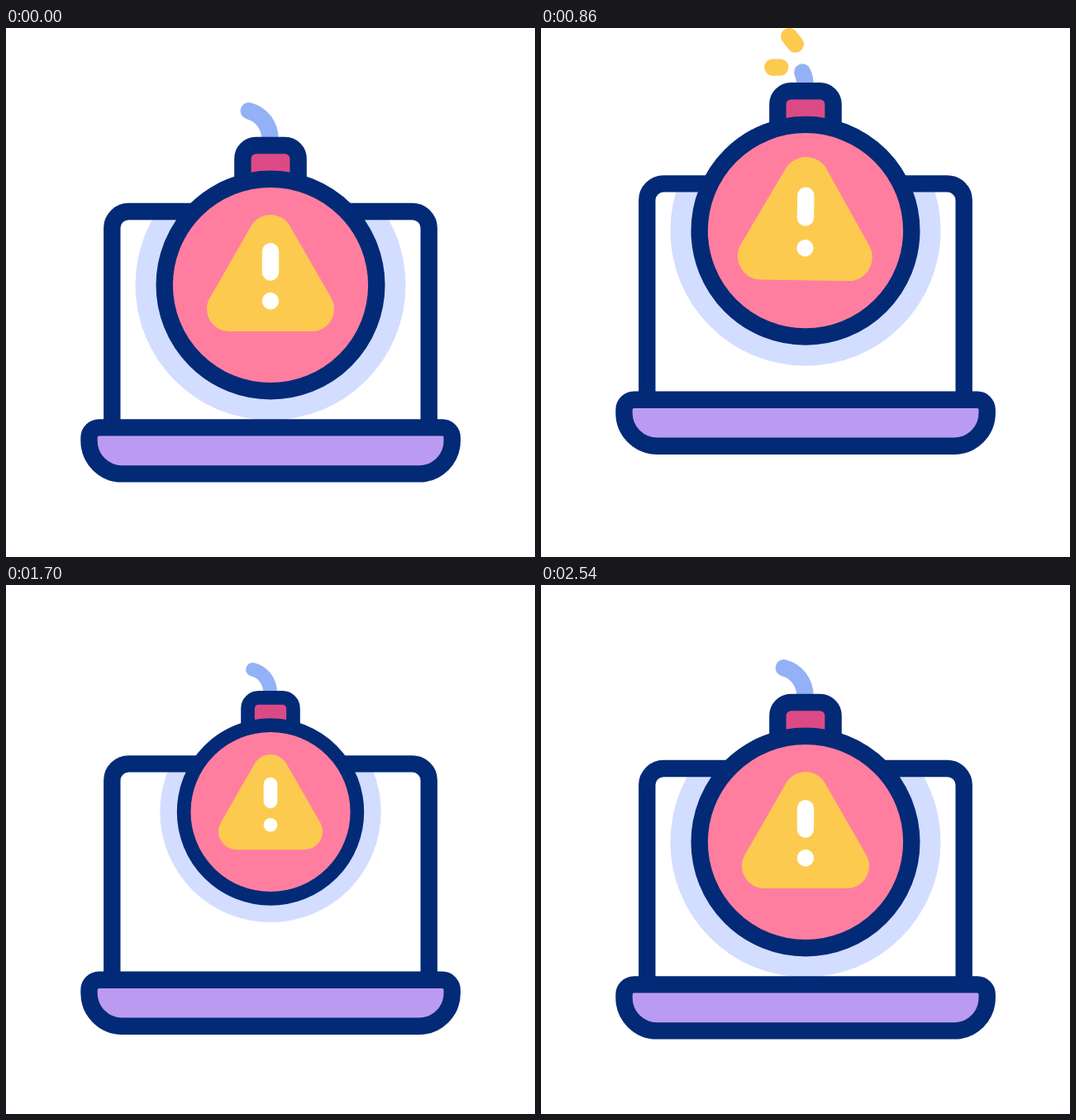
Animation, 640 px wide and 640 px high, one loop 3000 ms. Source, as an HTML page:

```html
<!DOCTYPE html>
<html lang="en">
<head>
<meta charset="utf-8">
<title>Laptop bomb</title>
<style>
  html, body { margin: 0; width: 100%; height: 100%; overflow: hidden; background: #fff; }
  svg { display: block; width: 100vw; height: 100vh; }
  .line { stroke: #032a76; stroke-width: 20.4; }
  .spark { stroke: #fdca50; stroke-width: 20.4; stroke-linecap: round; fill: none; }
</style>
</head>
<body>
<svg viewBox="0 0 640 640">
  <defs>
    <clipPath id="screen"><rect id="screenBox" x="128.5" y="222" width="383" height="262" rx="20"/></clipPath>
  </defs>
  <g clip-path="url(#screen)">
    <circle id="halo" cx="320" cy="311" r="163.5" fill="#d3ddff"/>
  </g>
  <g id="laptop" class="line">
    <path fill="none" d="M128.3 484V242a20 20 0 0 1 20-20H491.7a20 20 0 0 1 20 20V484"/>
    <path fill="#bb9bf1" d="M112.5 483.4H527.5a12 12 0 0 1 12.2 12V499.4a40 40 0 0 1-40 40H140.5a40 40 0 0 1-40-40V495.4a12 12 0 0 1 12-12z"/>
  </g>
  <g id="bomb">
    <path id="sparks" class="spark" d="M-16-43.5L-8.5-34M-36-6H-27"/>
    <path id="fuse" d="M319.6 142V135C319.6 118 309 104 293.8 100.3" pathLength="1" fill="none" stroke="#93b1f6" stroke-width="20.4" stroke-linecap="round"/>
    <path class="line" fill="#dc4a85" d="M286.4 200V158a16 16 0 0 1 16-16H337.6a16 16 0 0 1 16 16V200"/>
    <circle class="line" cx="320" cy="311" r="128.3" fill="#ff7ea0"/>
    <g id="sign" fill="#fdca50" stroke="#fdca50" stroke-linejoin="round">
      <path id="plate" d="M0-43.5L50 43.5H-50z" stroke-width="54"/>
      <path id="mark" fill="none" stroke="#fff" stroke-width="20.4" stroke-linecap="round"/>
    </g>
  </g>
  <path id="rays" class="spark"/>
</svg>
<script>
const LOOP = 3000, STEP = 20;
const BLAST = 1300, REBIRTH = 1500;
const { PI, sin, cos, min, max, floor } = Math;
const $ = id => document.getElementById(id);

// Progress from 0 to 1 between two times, and easings of it.
const span = (t, a, b) => min(1, max(0, (t - a) / (b - a)));
const smooth = u => u * u * (3 - 2 * u);
const easeOut = (u, p) => 1 - (1 - u) ** p;
const mix = (a, b, u) => a + (b - a) * u;

function laptopY(t) {
  if (t < 560) return 21 * span(t, 220, 560) ** 1.6;
  if (t < 1120) return mix(21, -39, easeOut(span(t, 560, 1120), 3.15));
  if (t < 1440) return mix(-39, 21.5, smooth(span(t, 1120, 1440)));
  // The recoil dies out as a damped swing.
  return 21.5 * (1 - span(t, 1440, 2240)) * cos(2 * PI * (t - 1440) / 830);
}

function bombY(t) {
  if (t < 490) return 33.8 * smooth(span(t, 220, 490));
  if (t < REBIRTH) return mix(33.8, -82.2, easeOut(span(t, 490, 1120), 2.21));
  return mix(-82.2, 0, easeOut(span(t, REBIRTH, 2200), 2.41));
}

const bombSize = t => t < REBIRTH
  ? 1 - span(t, 1028, 1320) ** 2
  : smooth(span(t, 1540, 1760));

const bombTilt = t =>
  6.7 * (1 - span(t, 1800, 2380)) ** 2 * sin(2 * PI * max(0, t - 1800) / 320);

const signSize = t => t < REBIRTH
  ? 1 - 0.241 * sin(PI * span(t, 220, 740)) ** 2 + 0.106 * smooth(span(t, 740, 966))
  : 1;

const signTilt = t => 4.5 * sin(2 * PI * span(t, 850, 1210));

const show = (el, on) => el.setAttribute('visibility', on ? 'visible' : 'hidden');
const move = (id, value) => $(id).setAttribute('transform', value);

function drawSign(t) {
  const s = signSize(t);
  move('sign', `translate(320 296.5) rotate(${signTilt(t)})`);
  move('plate', `scale(${s})`);
  // The mark keeps its line weight while its points spread.
  $('mark').setAttribute('d', `M0 ${4 - 30.3 * s}V${4 - 5 * s}M0 ${4 + 29.8 * s}h.01`);
}

function drawFuse(t) {
  const left = t < REBIRTH ? 1 - span(t, 460, 1162) : 1;
  const fuse = $('fuse');
  show(fuse, left > 0);
  fuse.setAttribute('stroke-dasharray', left < 1 ? `${left} 2` : 'none');
  const tip = fuse.getPointAtLength(fuse.getTotalLength() * left);
  show($('sparks'), t >= 680 && t < 1040);
  move('sparks', `translate(${tip.x} ${tip.y})`);
}

function drawRays(t) {
  const u = span(t, BLAST, 1620);
  const reach = 0.4 + 0.6 * easeOut(u, 2), grow = sin(PI * u);
  let d = '';
  for (let i = 0; i < 8; i++) {
    const diagonal = i % 2, a = i * PI / 4;
    const mid = (diagonal ? 147 : 132.8) * reach;
    const half = (diagonal ? 13.3 : 18.9) * grow;
    const point = r => `${320 + r * cos(a)} ${220 + r * sin(a)}`;
    d += `M${point(mid - half)}L${point(mid + half)}`;
  }
  $('rays').setAttribute('d', d);
  show($('rays'), u > 0 && u < 1);
}

function draw(t) {
  const shift = `translate(0 ${laptopY(t)})`;
  move('laptop', shift);
  move('screenBox', shift);
  const pose = `translate(0 ${bombY(t)}) rotate(${bombTilt(t)} 320 270) `
    + `translate(320 311) scale(${bombSize(t)}) translate(-320 -311)`;
  move('bomb', pose);
  move('halo', pose);
  drawSign(t);
  drawFuse(t);
  drawRays(t);
}

const start = performance.now();
function frame() {
  const t = (performance.now() - start) % LOOP;
  draw(floor(t / STEP) * STEP);
  requestAnimationFrame(frame);
}
frame();
</script>
</body>
</html>
```
